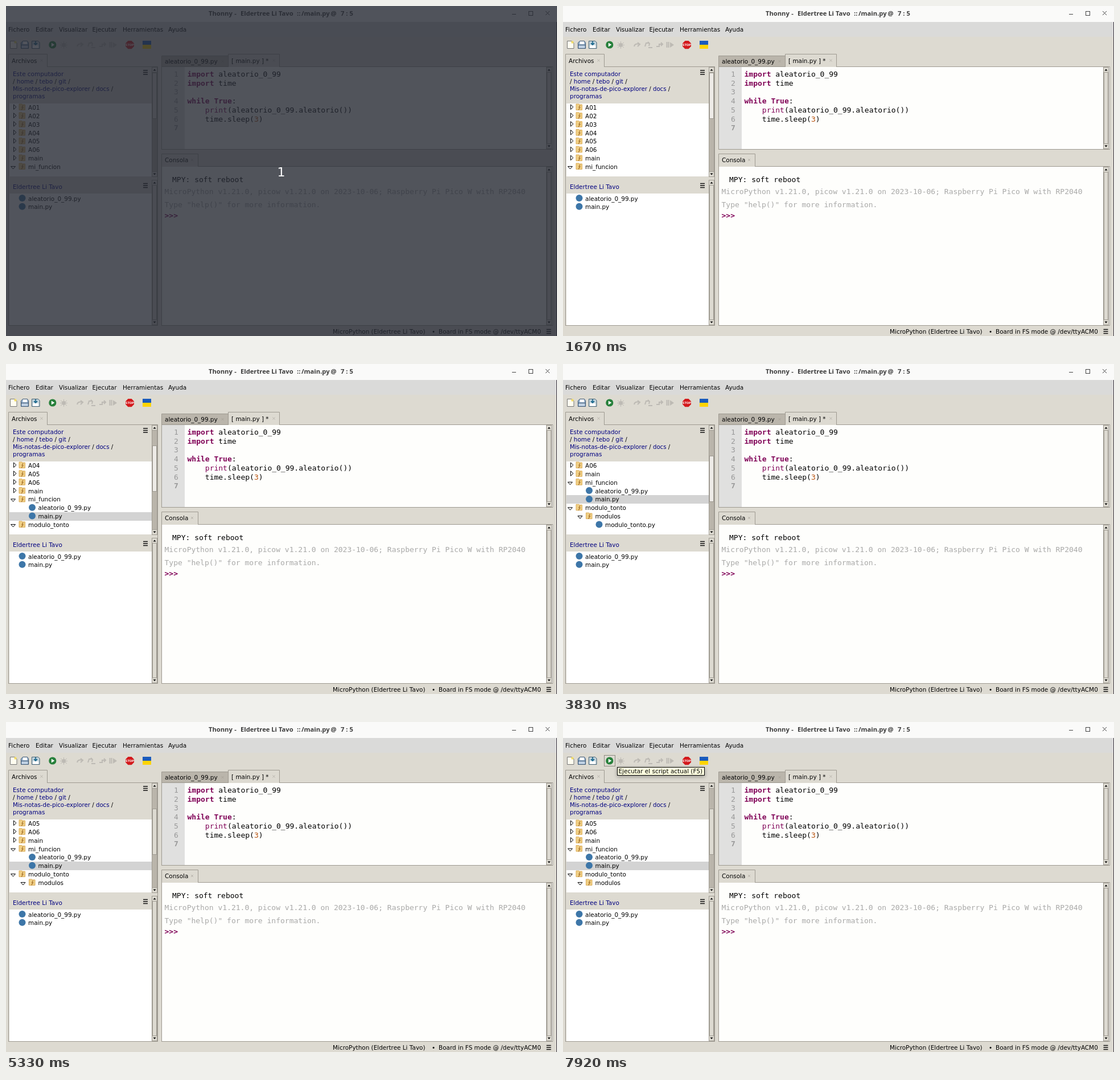
Animation, 968 px wide and 579 px high, one loop 8000 ms. Source, as an HTML page:

```html
<!DOCTYPE html>
<html lang="es">
<head>
<meta charset="utf-8">
<title>Thonny</title>
<style>
html, body { margin: 0; width: 100%; height: 100%; overflow: hidden; background: #dddad1; }
svg { display: block; }
text { font: 10.45px "DejaVu Sans", sans-serif; white-space: pre; }
.mono { font: 13px "DejaVu Sans Mono", monospace; }
.title { font: bold 11.2px "Noto Sans", sans-serif; }
.bold { font-weight: bold; }
.tip { filter: drop-shadow(0 2px 3px rgba(0, 0, 0, .35)); }
</style>
</head>
<body>
<svg id="stage" width="968" height="579" viewBox="0 0 968 579"></svg>
<script>
const BG = '#dddad1', EDGE = '#9e9a91', TROUGH = '#bab5ab', PAPER = '#fefefc';
const LINK = '#000080', KEY = '#7f0055';
const LOOP = 8000, ROW = 14.85;
const SCROLLS = [[0, 0], [2580, 1], [2670, 2], [3170, 3], [3750, 4], [3830, 5], [4420, 4]];

// name, depth, kind (closed folder, open folder, Python file)
const TREE = [
  ...[1, 2, 3, 4, 5, 6].map(n => ['A0' + n, 0, 'closed']),
  ['main', 0, 'closed'],
  ['mi_funcion', 0, 'open'],
  ['aleatorio_0_99.py', 1, 'py'],
  ['main.py', 1, 'py'],
  ['modulo_tonto', 0, 'open'],
  ['modulos', 1, 'open'],
  ['modulo_tonto.py', 2, 'py']
];
const SELECTED = 9;

const rect = (x, y, w, h, fill, more = '') =>
  `<rect x="${x}" y="${y}" width="${w}" height="${h}" fill="${fill}" ${more}/>`;
const box = (x, y, w, h, fill, stroke = EDGE) =>
  rect(x + .5, y + .5, w - 1, h - 1, fill, `stroke="${stroke}"`);
const path = (d, stroke, fill = 'none', width = 1) =>
  `<path d="${d}" stroke="${stroke}" fill="${fill}" stroke-width="${width}"/>`;
const dot = (x, y, r, fill) => `<circle cx="${x}" cy="${y}" r="${r}" fill="${fill}"/>`;
const text = (x, y, s, fill = '#000', cls = '', more = '') =>
  `<text x="${x}" y="${y}" fill="${fill}" class="${cls}" ${more}>${s}</text>`;
const mono = (x, y, s, fill, bold) => text(x, y, s, fill, bold ? 'mono bold' : 'mono');
const span = (s, fill, bold) =>
  `<tspan fill="${fill}"${bold ? ' class="bold"' : ''}>${s}</tspan>`;
const link = s => span(s, LINK);
const cross = (x, y, r, color) =>
  path(`M${x - r} ${y - r}l${2 * r} ${2 * r}m0 ${-2 * r}l${-2 * r} ${2 * r}`, color);
const burger = (x, y) => path(`M${x - 4} ${y - 3.5}h8m-8 3.5h8m-8 3.5h8`, '#111', 'none', 1.3);

function scrollbar(x, top, bottom, thumbTop, thumbEnd, fill = BG) {
  const m = x + 5;
  return box(x, top, 10, bottom - top, TROUGH) +
    box(x + 1, thumbTop, 8, thumbEnd - thumbTop, fill) +
    box(x, top, 10, 10, BG) + box(x, bottom - 10, 10, 10, BG) +
    path(`M${m - 2.5} ${top + 6.5}h5l-2.5 -3z`, 'none', '#000') +
    path(`M${m - 2.5} ${bottom - 6.5}h5l-2.5 3z`, 'none', '#000');
}
const fullBar = (x, top, bottom) => scrollbar(x, top, bottom, top + 9, bottom - 9);

const tab = (x, y, w, h, fill) =>
  path(`M${x + .5} ${y + h}v${-h + .5}h${w - 1}v${h - .5}`, EDGE, fill);

function folder(x, y) {
  return path(`M${x} ${y - 5}h5l1 1h4.5v9.5h-10.5z`, '#dcae5c', '#f0cf85') +
    path(`M${x + 7} ${y - 3}l-2 4h2l-3 4.5`, '#a9762f', 'none', 1.2);
}

function treeRow([name, depth, kind], y) {
  const dx = depth * 17.5;
  let s = text(39 + dx, y + 4, name);
  if (kind == 'py') return s + dot(28.5 + dx, y - .5, 6, '#3d76a8');
  s += folder(23 + dx, y - 1);
  return s + (kind == 'open'
    ? path(`M${8.5 + dx} ${y - .5}h8l-4 4.5z`, '#000', '#fff')
    : path(`M13.5 ${y - 5}v8.5l4.5 -4.25z`, '#000', '#fff'));
}

function titleBar() {
  const words = [[356, 'Thonny'], [401.3, '-'], [412, 'Eldertree Li Tavo'], [511, '::'],
    [519, '/main.py'], [570.5, '@'], [588, '7 : 5']];
  return rect(0, 0, 968, 28, '#fafaf9') +
    words.map(([x, s]) => text(x, 17, s, '#3c3c3c', 'title')).join('') +
    path('M889 14.5h7', '#444') + box(918, 9, 8, 8, 'none', '#444') + cross(951.5, 12.5, 3.5, '#444');
}

function menu() {
  const items = [[4, 'Fichero'], [52, 'Editar'], [93, 'Visualizar'], [151.5, 'Ejecutar'],
    [205, 'Herramientas'], [285, 'Ayuda']];
  return rect(0, 28, 968, 26, '#dadad9') + items.map(([x, s]) => text(x, 44.5, s)).join('');
}

function toolbar() {
  const gray = '#bdbab4';
  const step = (x, d) => path(`M${x} 71${d}`, gray, 'none', 2);
  return path('M7.5 61.5h8l3.5 3.5v9.5h-11.5z', '#777', '#fffdf0') + dot(16.5, 63.5, 2.2, '#f2dc6a') +
    path('M26.5 74.5v-10l3 -3h8l2 3v10z', '#34506f', '#9db6cf') +
    rect(30, 62, 7, 5, '#fff') + rect(28, 69, 10, 5, '#bfd0e2') + path('M27 68.5h12', '#34506f') +
    path('M45.5 61.5h11l2.5 2.5v10.5h-13.5z', '#3f5f73', '#c9d8e0') +
    rect(47, 69, 10, 5, '#fff') + path('M52 62v6m-3 -3l3 3l3 -3', '#1f6b8f', 'none', 1.8) +
    dot(81.8, 68, 6.6, '#27803b') + path('M79.8 64.5v7l5.5 -3.5z', 'none', '#fff') +
    dot(101.5, 68.5, 3.4, gray) +
    path('M96 64l11 9m0 -9l-11 9m-1 -4.5h13m-6.5 -6.5v13', gray) +
    step(125, 'q1 -6 9 -4m-3 -3l4 3l-4 4') + step(144, 'l2 -6h6m-3 -2l3 3l-1 4m-1 3h7') +
    step(164, 'h5v-4h6m-3 -3l3 3l-3 3') + path('M182.5 63v10m3 -10v10', gray, 'none', 2) +
    path('M188 63.5v9.5l7 -4.75z', 'none', gray) +
    path('M214.4 61h6.2l4.4 4.4v5.4l-4.4 4.4h-6.2l-4.4 -4.4v-5.4z', 'none', '#d3191c') +
    text(217.5, 70.3, 'STOP', '#fff', 'bold', 'text-anchor="middle" style="font-size:5px"') +
    rect(240, 61, 15, 7, '#1a5bbc') + rect(240, 68, 15, 7, '#ffd400');
}

function leftPane() {
  return box(4, 106, 263, 455, BG) + tab(4, 84, 69, 23, BG) +
    text(10, 99.5, 'Archivos') + cross(62.5, 95.5, 2, '#b5b1a9') +
    text(12, 122.5, 'Este computador', LINK) +
    text(12, 135.8, '/ ' + link('home') + ' / ' + link('tebo') + ' / ' + link('git') + ' /') +
    text(12, 148.8, link('Mis-notas-de-pico-explorer') + ' / ' + link('docs') + ' /',
      '#000', '', 'style="font-size:10.2px"') +
    text(12, 162, 'programas', LINK) + burger(245, 116.5) +
    rect(6, 171, 250, 128, '#fff') +
    rect(5, 300, 261, 5, BG) + text(12, 321, 'Eldertree Li Tavo', LINK) + burger(245, 315) +
    rect(6, 329, 250, 231, '#fff') + fullBar(256, 305, 560) +
    treeRow(['aleatorio_0_99.py', 0, 'py'], 337.5) + treeRow(['main.py', 0, 'py'], 352.3);
}

function editor() {
  const y = n => 124 + 15.7 * (n - 1);
  const code = [
    span('import', KEY, 1) + ' aleatorio_0_99',
    span('import', KEY, 1) + ' time',
    '',
    span('while True', KEY, 1) + ':',
    '    ' + span('print', KEY) + '(aleatorio_0_99.aleatorio())',
    '    time.sleep(' + span('3', '#b8520e') + ')',
    ''
  ];
  return box(273, 106, 688, 146, PAPER) + rect(274, 107, 40, 144, '#e0e0df') +
    tab(273, 87, 118, 19, TROUGH) + text(279, 101, 'aleatorio_0_99.py') + cross(380.5, 97, 2, '#aaa59b') +
    tab(390, 84, 91, 23, BG) + text(396, 99.5, '[ main.py ] *') + cross(470.5, 95.5, 2, '#b5b1a9') +
    code.map((s, i) => mono(295, y(i + 1), i + 1, '#999', i == 6) +
      mono(318.5, y(i + 1), s, '#000')).join('') +
    fullBar(949, 107, 251);
}

function consolePane() {
  return box(273, 281, 688, 280, PAPER) + tab(273, 259, 65, 23, BG) +
    text(279, 274, 'Consola') + cross(327, 270, 2, '#b5b1a9') +
    mono(292, 309, 'MPY: soft reboot', '#000') +
    mono(278.5, 330, 'MicroPython v1.21.0, picow v1.21.0 on 2023-10-06; Raspberry Pi Pico W with RP2040', '#a9a9a8') +
    mono(278.5, 353, 'Type "help()" for more information.', '#a9a9a8') +
    mono(278.5, 372, '&gt;&gt;&gt;', KEY, 1) +
    fullBar(949, 282, 560) +
    text(574, 574.5, 'MicroPython (Eldertree Li Tavo)') + text(748, 574.5, '•') +
    text(760, 574.5, 'Board in FS mode @ /dev/ttyACM0') + burger(953.5, 571);
}

function tree(first, hot) {
  let s = '';
  TREE.slice(first, first + 8).forEach((item, k) => {
    const y = 178 + ROW * k;
    if (first + k == SELECTED) s += rect(6, Math.round(y - 7.6), 250, 15, '#d3d3d3');
    s += treeRow(item, y);
  });
  const top = Math.floor(117.2 + 8.8 * first);
  return s + scrollbar(256, 107, 300, top, top + 81, hot ? '#eeebe7' : BG);
}

const runHover = box(72, 58, 20, 20, 'none', '#8d8981') +
  `<g class="tip">${box(95, 79, 154, 15, '#ffffe0', '#000')}</g>` +
  text(97.5, 90.2, 'Ejecutar el script actual (F5)');
const countdown = rect(0, 0, 968, 579, 'rgb(38,42,52)', 'opacity=".8"') +
  text(483.5, 298.5, '1', '#fff', '', 'text-anchor="middle" style="font-size:22px"');

const stage = document.getElementById('stage');
stage.innerHTML = rect(0, 0, 968, 579, BG) + titleBar() + menu() + toolbar() +
  leftPane() + editor() + consolePane() + rect(967, 28, 1, 551, '#3a3540') + '<g id="live"></g>';
const live = document.getElementById('live');

let shown = '';
function draw() {
  const t = performance.now() % LOOP;
  const within = (a, b) => t >= a && t < b;
  const first = SCROLLS.filter(([at]) => at <= t).pop()[1];
  const hot = within(1670, 1750) || within(2170, 5330);
  const s = tree(first, hot) +
    (within(7580, 7670) ? rect(12, 150, 137, 1, LINK) : '') +
    (t >= 7920 ? runHover : '') + (t < 80 ? countdown : '');
  if (s != shown) live.innerHTML = shown = s;
  requestAnimationFrame(draw);
}
draw();
</script>
</body>
</html>
```
